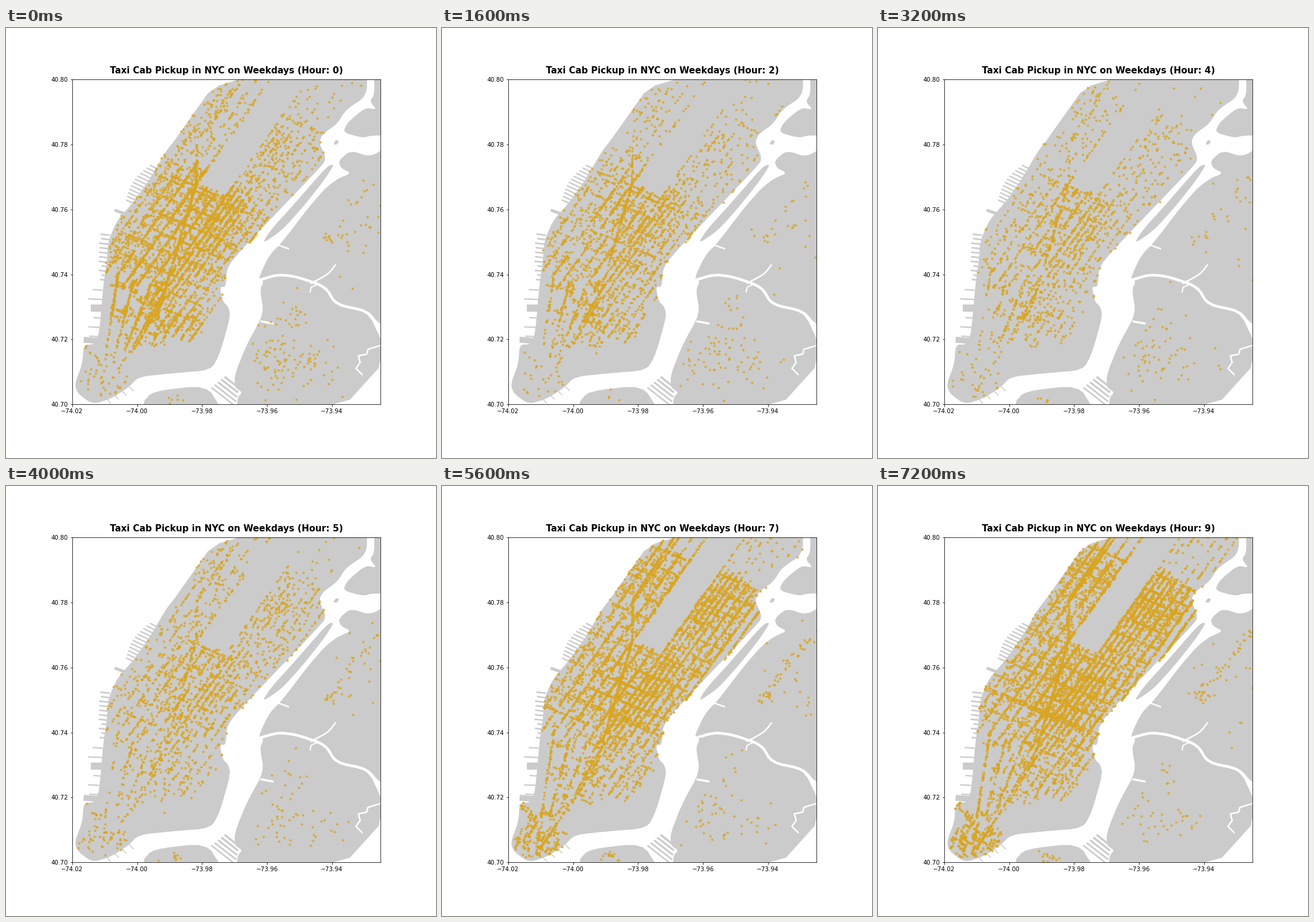
These frames come from a looping animation (720 px wide and 720 px high, 8000 ms). A matplotlib script:

```python
import numpy as np
import matplotlib.pyplot as plt
from matplotlib.animation import FuncAnimation
from matplotlib.path import Path

LAND, GOLD = "#cbcbcb", "goldenrod"
LEFT, TOP, SCALE = 110.8, 86.4, 5436.0  # stage pixels, pixels per degree
BLOCK = 3.44                            # one city block along an avenue
rng = np.random.default_rng(59)

fig = plt.figure(figsize=(10, 10), dpi=72, facecolor="white")
ax = fig.add_axes([LEFT / 720, 0.125, 516.42 / 720, 0.755])
ax.set_xlim(-74.02, -73.925)
ax.set_ylim(40.70, 40.80)
ax.set_xticks(np.arange(-74.02, -73.93, 0.02))
ax.set_yticks(np.arange(40.70, 40.801, 0.02))
ax.xaxis.set_major_formatter("{x:.2f}")
ax.yaxis.set_major_formatter("{x:.2f}")
ax.tick_params(labelsize=10)
title = ax.set_title("", fontsize=15, fontweight="bold", pad=10.4)


# ---- drawing helpers, all in stage pixels -----------------------------
def geo(pts):
    """Stage pixels to longitude and latitude."""
    pts = np.asarray(pts, float)
    return np.column_stack([-74.02 + (pts[:, 0] - LEFT) / SCALE,
                            40.80 - (pts[:, 1] - TOP) / SCALE])


def soften(pts, closed=True, passes=2, cut=0.2):
    """Round a polyline by cutting its corners."""
    pts = np.asarray(pts, float)
    for _ in range(passes):
        nxt = np.roll(pts, -1, axis=0) if closed else pts[1:]
        cur = pts if closed else pts[:-1]
        pairs = np.stack([cur + cut * (nxt - cur), nxt - cut * (nxt - cur)], 1)
        cuts = pairs.reshape(-1, 2)
        pts = cuts if closed else np.vstack([pts[:1], cuts[1:-1], pts[-1:]])
    return pts


def land(pts):
    shape = soften(pts)
    ax.fill(*geo(shape).T, color=LAND, lw=0, zorder=1)
    return Path(shape)


def stroke(pts, width, color):
    ax.plot(*geo(pts).T, color=color, lw=width, zorder=1.2,
            solid_capstyle="butt", solid_joinstyle="round")


# ---- land -------------------------------------------------------------
manhattan = land([
    (356, 84), (300, 163), (281, 190), (268, 206), (240, 254), (213, 292),
    (186, 322), (171, 357), (169, 390), (163, 430), (156, 512), (148, 530),
    (130, 530), (128, 562), (115, 596), (120, 612), (145, 630), (175, 621),
    (205, 602), (222, 584), (281, 578), (343, 573), (358, 546), (376, 482),
    (372, 466), (363, 458), (358, 433), (368, 434), (370, 400), (400, 365),
    (520, 240), (537, 220), (524, 192), (530, 178), (555, 160), (569, 137),
    (604, 114), (605, 70)])
long_island = land([
    (640, 198), (610, 216), (577, 205), (557, 222), (560, 234), (578, 243),
    (556, 252), (535, 268), (507, 300), (462, 359), (441, 380), (422, 420),
    (432, 424), (425, 438), (432, 478), (403, 530), (383, 580), (383, 602),
    (396, 610), (388, 618), (386, 640), (362, 640), (336, 598), (246, 608),
    (228, 628), (240, 640), (640, 640)])
land([(640, 180), (612, 180), (598, 184), (564, 175), (572, 158), (602, 133),
      (621, 137), (609, 123), (617, 111), (616, 70), (640, 70)])
land([(428, 362), (444, 337), (478, 300), (538, 231), (550, 228), (532, 256),
      (497, 300), (462, 339)])
land([(548, 194), (553, 187), (558, 190), (553, 196)])

# Hudson piers, uptown to downtown
for t in np.linspace(0, 1, 12):
    x, y, reach = 254 - 40 * t, 236 + 58 * t, 13 + 7 * np.sin(np.pi * t)
    stroke([(x, y), (x - reach, y - 0.47 * reach)], 2.4, LAND)
for y in np.linspace(346, 422, 11):
    stroke([(174, y + 1), (rng.uniform(155, 160), y - 1)], 2.6, LAND)
for y in np.linspace(439, 517, 6):
    stroke([(162, y), (rng.uniform(136, 149), y - 1)], 2.2, LAND)
stroke([(162, 469), (142, 469)], 12, LAND)
stroke([(155, 524), (130, 522)], 10, LAND)
stroke([(199, 311), (182, 305)], 5, LAND)
for t in np.linspace(0, 1, 4):
    x, y = 168 + 38 * t, 621 - 21 * t
    stroke([(x, y), (x + 8, y + 8)], 1.5, LAND)

# Navy yard slips
for t in np.linspace(0, 1, 5):
    x, y, reach = 344 + 22 * t, 602 - 18 * t, 40 - 16 * t
    stroke([(x, y), (x + reach, y + 0.78 * reach)], 2.6 + t, LAND)

# creeks and inlets
creek = soften([(424, 422), (455, 413), (485, 416), (535, 433), (552, 463),
                (606, 474), (628, 505)], closed=False)
stroke(creek, 4.5, "white")
ax.fill(*geo([(600, 474), (617, 487), (630, 498), (630, 526), (613, 490)]).T,
        color="white", lw=0, zorder=1.1)
stroke(soften([(510, 428), (540, 412), (552, 396)], closed=False), 2.5, "white")
stroke([(520, 430), (511, 434), (509, 443)], 2, "white")
stroke([(452, 362), (474, 370)], 2.5, "white")
stroke([(426, 491), (448, 495)], 3.5, "white")
stroke([(629, 531), (606, 538), (604, 546), (590, 549), (593, 560), (586, 570),
        (597, 581)], 2.5, "white")

# ---- street network ---------------------------------------------------
def grid(a, v):
    """Street grid (across, along) from the park's south-west corner."""
    return 318 + a + 0.71 * v, 260 + 0.42 * a - v


def along(p, q, per_px, jitter=0.6):
    p, q = np.array(p, float), np.array(q, float)
    n = int(np.hypot(*(q - p)) * per_px)
    return p + rng.random((n, 1)) * (q - p) + rng.normal(0, jitter, (n, 2))


pool = []
west, middle = np.arange(-70, 1, 17.5), (17, 34)
east, far_east = 50 + 8.5 * np.arange(5), 97 + 13 * np.arange(4)
for a in (*west, *middle, *east, *far_east):
    south = -210 if a > 80 else -165
    pool.append(along(grid(a, south), grid(a, 225), 6))

for street in range(1, 100):
    v = (street - 59) * BLOCK
    main = street % 7 == 0 or street % 29 == 0
    first, last = (-72, 126) if street > 14 else (45, 145)
    pool.append(along(grid(first, v), grid(last, v), 4 if main else 0.9))

broadway = [(388, 86), (319, 190), (318, 260), (292, 350), (266, 439),
            (205, 545), (165, 605)]
for p, q in zip(broadway, broadway[1:]):
    pool.append(along(p, q, 8))
for k in range(4):
    pool.append(along((188 + 26 * k, 408 + 14 * k), (165 + 15 * k, 556 - 4 * k), 7))


def side_streets(count, xs, ys, dx, dy):
    """Short irregular streets, some of them turned across the others."""
    for _ in range(count):
        x, y = rng.uniform(*xs), rng.uniform(*ys)
        step = (dx, dy) if rng.random() < 0.5 else (0.6 * dx, -12)
        pool.append(along((x, y), (x + step[0], y + step[1]), 3))


side_streets(90, (172, 262), (425, 545), 11, 5)
side_streets(80, (120, 205), (533, 624), 9, 6)
pool = np.vstack(pool)

# keep points on land and outside the park
pool = pool[manhattan.contains_points(pool, radius=-2)]
dx, dy = (pool - (318, 260)).T
across = (dx + 0.71 * dy) / (1 + 0.71 * 0.42)
up = 0.42 * across - dy
keep = ~((across > 2.5) & (across < 47.5) & (up > 1.5))
pool, across, up = pool[keep], across[keep], up[keep]


def density(base, spots):
    d = np.full(len(pool), base)
    for x, y, r in spots:
        d += np.exp(-((pool - (x, y)) ** 2).sum(1) / (2 * r * r))
    harlem = (across > 40) & (up > 145 - 0.15 * (across - 50))
    south_edge = (pool[:, 1] > 532) & (pool[:, 0] > 215)
    d *= np.where(harlem | south_edge, 0.25, 1)
    return d / d.sum()


night = density(0.2, [(312, 283, 32), (355, 310, 34), (285, 355, 50),
                      (190, 407, 20), (225, 455, 36), (283, 510, 28)])
morning = density(0.35, [(345, 335, 48), (285, 345, 45), (470, 212, 50),
                         (350, 145, 50), (140, 565, 25), (165, 600, 22)])

# ---- pickups by hour --------------------------------------------------
boroughs = [  # x, y, spread x, spread y, night, morning
    (450, 553, 22, 28, 70, 8), (520, 565, 25, 18, 32, 6), (483, 480, 13, 20, 18, 3),
    (543, 351, 10, 6, 12, 15), (600, 325, 24, 48, 22, 14), (281, 621, 9, 5, 6, 14)]


def pickups(hour):
    pick = np.random.default_rng(100 + hour)
    late = 5600 * np.exp(-0.33 * hour)                    # nightlife fades
    early = 8800 / (1 + np.exp(-1.5 * (hour - 6.3)))      # commute builds up
    w = early / (late + early)
    city = pool[pick.choice(len(pool), int(late + early), replace=False,
                            p=(1 - w) * night + w * morning)]
    fade = np.exp(-0.16 * hour)
    outer = [pick.normal((x, y), (sx, sy), (int(n * fade + m * w), 2))
             for x, y, sx, sy, n, m in boroughs]
    t = pick.random((int(8 + 26 * w), 1))
    outer.append((548, 340) + t * (80, -100) + pick.normal(0, 4, (len(t), 2)))
    outer = np.vstack(outer)
    outer = outer[long_island.contains_points(outer)]
    return geo(np.vstack([city, outer]))


hours = [pickups(h) for h in range(10)]
dots, = ax.plot([], [], "o", color=GOLD, ms=4, mew=0, alpha=0.8, zorder=2)


def draw(hour):
    dots.set_data(*hours[hour].T)
    title.set_text(f"Taxi Cab Pickup in NYC on Weekdays (Hour: {hour})")
    return dots, title


anim = FuncAnimation(fig, draw, frames=10, interval=800, repeat=True,
                     repeat_delay=0, blit=False)
plt.show()
```
